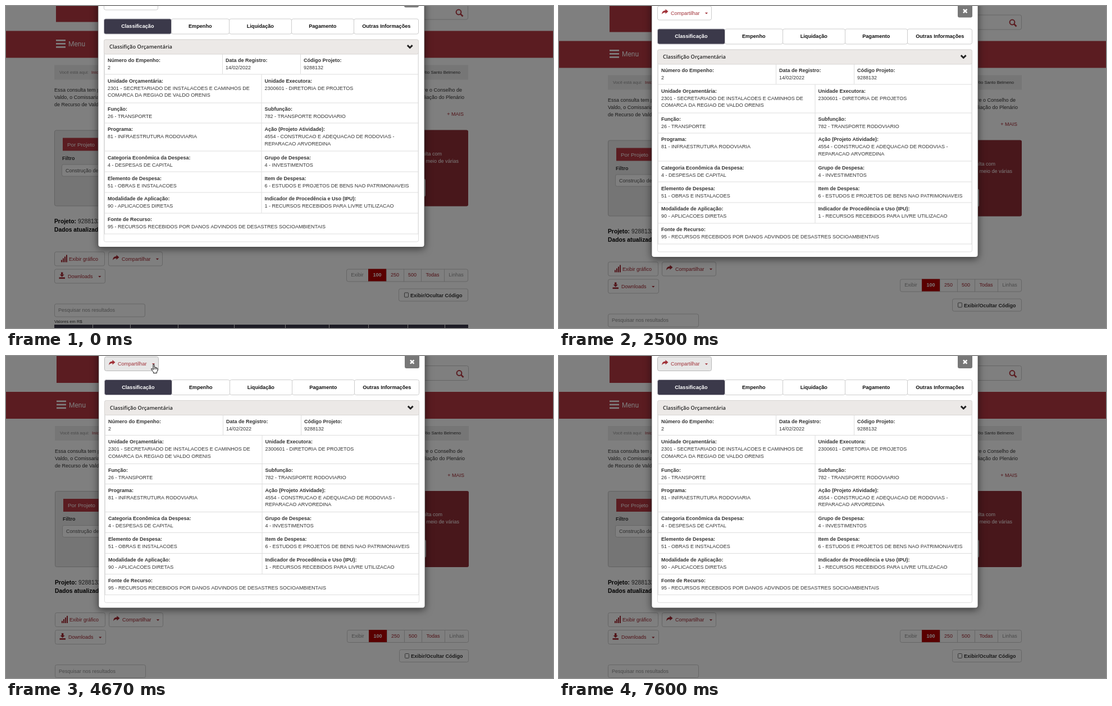
Animation, 974 px wide and 575 px high, one loop 8 s. Source, as an HTML page with a canvas:

```html
<!DOCTYPE html>
<html lang="pt-BR">
<head>
<meta charset="utf-8">
<title>Consulta de empenho</title>
<style>
html, body { margin: 0; width: 100%; height: 100%; overflow: hidden; background: #7f7f7f; }
canvas { display: block; }
</style>
</head>
<body>
<canvas id="stage" width="974" height="575"></canvas>
<script>
const ctx = document.getElementById('stage').getContext('2d');
const LOOP = 8000;
const SANS = '"Liberation Sans", Arial, sans-serif';
const DIM = { page: '#7f7f7f', line: '#666', red: '#5b1c21', link: '#511318', ink: '#1a1a1a' };

// Scroll steps: time, dx, dy
const SCROLL = [[0, -1, -19.5], [2340, 0, -5], [2500, 0, -1.5], [2640, 0, 0]];
// Pointer steps: time, shape, x, y
const POINTER = [
  [0, null], [750, arrow, 921, 194], [900, arrow, 793, 211], [1060, arrow, 786, 211],
  [1510, arrow, 784, 208], [1660, null], [2790, arrow, 705, -1], [2940, arrow, 650, 11],
  [3070, arrow, 620, 20], [3940, arrow, 394, 27], [4090, arrow, 257, 26],
  [4240, hand, 258, 19], [4390, hand, 258, 17], [4520, hand, 258, 14],
  [5410, hand, 257, 14], [5560, hand, 228, 26], [5710, hand, 227, 28],
  [5840, hand, 226, 28], [6850, arrow, 227, 37], [7600, null]
];

// One row: top, bottom, then cells of [x, label, ...lines]
const ROWS = [
  [105, 141, [176, 'Número do Empenho:', '2'], [386, 'Data de Registro:', '14/02/2022'], [525, 'Código Projeto:', '9288132']],
  [141.5, 192, [176, 'Unidade Orçamentária:', '2301 - SECRETARIADO DE INSTALACOES E CAMINHOS DE', 'COMARCA DA REGIAO DE VALDO ORENIS'],
    [455.5, 'Unidade Executora:', '2300601 - DIRETORIA DE PROJETOS']],
  [192, 228, [176, 'Função:', '26 - TRANSPORTE'], [455.5, 'Subfunção:', '782 - TRANSPORTE RODOVIARIO']],
  [228, 278, [176, 'Programa:', '81 - INFRAESTRUTURA RODOVIARIA'],
    [455.5, 'Ação (Projeto Atividade):', '4554 - CONSTRUCAO E ADEQUACAO DE RODOVIAS -', 'REPARACAO ARVOREDINA']],
  [278.5, 315, [176, 'Categoria Econômica da Despesa:', '4 - DESPESAS DE CAPITAL'], [455.5, 'Grupo de Despesa:', '4 - INVESTIMENTOS']],
  [315.5, 352, [176, 'Elemento de Despesa:', '51 - OBRAS E INSTALACOES'], [455.5, 'Item de Despesa:', '6 - ESTUDOS E PROJETOS DE BENS NAO PATRIMONIAVEIS']],
  [352, 389, [176, 'Modalidade de Aplicação:', '90 - APLICACOES DIRETAS'], [455.5, 'Indicador de Procedência e Uso (IPU):', '1 - RECURSOS RECEBIDOS PARA LIVRE UTILIZACAO']],
  [389, 426, [176, 'Fonte de Recurso:', '95 - RECURSOS RECEBIDOS POR DANOS ADVINDOS DE DESASTRES SOCIOAMBIENTAIS']]
];

const at = (steps, t) => steps.findLast(s => s[0] <= t);

function rect(x, y, w, h, color) {
  ctx.fillStyle = color;
  ctx.fillRect(x, y, w, h);
}

// The border lies inside the given bounds
function box(x, y, w, h, fill, stroke, radius = 3) {
  const inset = stroke ? .5 : 0;
  ctx.beginPath();
  ctx.roundRect(x + inset, y + inset, w - 2 * inset, h - 2 * inset, radius);
  if (fill) { ctx.fillStyle = fill; ctx.fill(); }
  if (stroke) { ctx.strokeStyle = stroke; ctx.lineWidth = 1; ctx.stroke(); }
}

// y is the middle of the capitals
function text(str, x, y, color, { size = 9, weight = 400, align = 'left', family = SANS } = {}) {
  ctx.font = `${weight} ${size}px ${family}`;
  ctx.textAlign = align;
  ctx.fillStyle = color;
  ctx.fillText(str, x, y + size * .36);
}

function polygon(points, fill, stroke) {
  ctx.beginPath();
  points.forEach(([x, y]) => ctx.lineTo(x, y));
  ctx.closePath();
  ctx.fillStyle = fill;
  ctx.fill();
  if (stroke) { ctx.strokeStyle = stroke; ctx.lineWidth = 1; ctx.stroke(); }
}

function polyline(points, color, width) {
  ctx.beginPath();
  points.forEach(([x, y]) => ctx.lineTo(x, y));
  ctx.strokeStyle = color;
  ctx.lineWidth = width;
  ctx.stroke();
}

const caret = (x, y, color) => polygon([[x - 2.6, y - 1], [x + 2.6, y - 1], [x, y + 1.8]], color);

function shareIcon(x, y, color) {
  ctx.beginPath();
  ctx.moveTo(x, y + 9.5);
  ctx.quadraticCurveTo(x + .3, y + 2.6, x + 6.5, y + 2.5);
  ctx.lineTo(x + 6.5, y);
  ctx.lineTo(x + 11.5, y + 4.3);
  ctx.lineTo(x + 6.5, y + 8.6);
  ctx.lineTo(x + 6.5, y + 6);
  ctx.quadraticCurveTo(x + 2, y + 5.8, x, y + 9.5);
  ctx.fillStyle = color;
  ctx.fill();
}

function shareButton(x, y, fill, border, color) {
  box(x, y, 97, 26, fill, border);
  shareIcon(x + 8, y + 6, color);
  text('Compartilhar', x + 24, y + 13, color);
  caret(x + 87.5, y + 13.3, color);
}

function pageHeader() {
  rect(90, -28, 76, 76, DIM.red);
  box(600, 17, 224, 27, DIM.page, DIM.line);
  ctx.beginPath();
  ctx.arc(807, 30.5, 4.4, 0, Math.PI * 2);
  ctx.strokeStyle = DIM.red;
  ctx.lineWidth = 2;
  ctx.stroke();
  polyline([[810.2, 33.7], [814.5, 38]], DIM.red, 2.6);

  rect(-2, 64, 980, 48, DIM.red);
  for (const y of [79.5, 85.5, 91.5]) rect(90, y, 17, 2.7, DIM.page);
  text('Menu', 112, 87.5, DIM.page, { size: 12, family: 'Roboto, sans-serif' });
}

function pageIntro() {
  rect(87, 125, 737, 26, '#767676');
  text('Você está aqui:', 96, 137.5, '#4a4a4a', { size: 7.6 });
  text('Início', 153, 137.5, DIM.link, { size: 7.7 });
  text('Rio Santo Belmeno', 810, 137.5, DIM.ink, { size: 7.7, align: 'right' });

  ['Essa consulta tem p', 'Valdo, o Comissariado', 'de Recurso de Valdo'].forEach((line, i) =>
    text(line, 87, 169.5 + i * 13, DIM.ink));
  text('entre o Conselho de', 813, 169.5, DIM.ink, { align: 'right' });
  text('mediação do Plenário', 817, 182.5, DIM.ink, { align: 'right' });
  text('+ MAIS', 816, 212.5, DIM.link, { align: 'right' });
}

function pageFilter() {
  box(87, 241, 737, 136, '#757575', '#626262');
  box(600, 241, 224, 136, '#48171b', null);
  rect(102, 255, 80, 23, DIM.red);
  text('Por Projeto', 110, 266.5, DIM.page, { size: 9.8 });
  text('Filtro', 101, 291, DIM.ink, { weight: 700 });
  box(100, 302, 120, 22, DIM.page, DIM.line);
  text('Construção de', 107, 312.8, '#2b2b2b');
  text('consulta com', 777, 283, DIM.page, { align: 'right' });
  text('por meio de várias', 807, 296, DIM.page, { align: 'right' });
  box(700, 328, 48, 32, DIM.page, null);

  text('Projeto:', 87, 403.8, '#000', { size: 10.3, weight: 700 });
  text('9288132', 129, 403.8, DIM.ink, { size: 10.3 });
  text('Dados atualizados', 87, 419, '#000', { size: 10.3, weight: 700 });
}

function pageTools() {
  box(87, 458, 90, 26, DIM.page, DIM.line);
  for (let i = 0; i < 4; i++) rect(99 + i * 3, 473 - i * 3, 2, 4 + i * 3, DIM.link);
  text('Exibir gráfico', 113, 471.2, DIM.link);
  shareButton(183, 458, DIM.page, DIM.line, DIM.link);

  box(87, 489, 91, 26, DIM.page, DIM.line);
  rect(99, 495, 3.4, 4, DIM.link);
  polygon([[96.7, 499], [104.7, 499], [100.7, 503.3]], DIM.link);
  rect(95.5, 504, 10.5, 2.6, DIM.link);
  text('Downloads', 111, 502.2, DIM.link);
  caret(167.8, 502.5, DIM.link);

  box(607, 489, 217, 23, DIM.page, DIM.line);
  const edges = [607, 646, 678, 709, 740, 781, 824];
  ['Exibir', '100', '250', '500', 'Todas', 'Linhas'].forEach((label, i) => {
    const x = edges[i], active = label === '100', muted = i % 5 === 0;
    if (i) rect(x, 489, 1, 23, DIM.line);
    if (active) rect(x, 489, 32, 22, '#5a0000');
    text(label, (x + edges[i + 1]) / 2, 499.5, active ? DIM.page : muted ? '#4a4a4a' : DIM.link,
      { align: 'center', weight: active ? 700 : 400 });
  });

  box(700, 524, 124, 23, DIM.page, DIM.line);
  box(710, 531, 8, 9, DIM.page, '#333', 1);
  text('Exibir/Ocultar Código', 721, 535.8, DIM.ink, { weight: 700 });

  box(87, 551, 162, 24, DIM.page, DIM.line);
  text('Pesquisar nos resultados', 94, 562.5, '#484848');
  text('Valores em R$', 87, 583, DIM.ink, { size: 7.6 });
  rect(87, 588.5, 737, 20, '#1d1c25');
  for (const x of [155, 222, 307, 407, 498, 576, 646, 716, 782]) rect(x, 588.5, 1, 20, '#777');
}

function modalFrame() {
  ctx.save();
  ctx.shadowColor = 'rgba(0,0,0,.55)';
  ctx.shadowBlur = 14;
  ctx.shadowOffsetY = 3;
  box(164.7, -60, 581.6, 510.3, '#555', null, 4);
  ctx.restore();
  box(165.4, -60, 580.2, 509.6, '#fff', null, 4);
  box(710, -3, 26, 25, '#777', null);
  polyline([[720, 7.3], [726.4, 13.7]], '#fff', 2.6);
  polyline([[726.4, 7.3], [720, 13.7]], '#fff', 2.6);
}

function modalTabs() {
  const edges = [175, 295, 398, 509, 620, 736];
  ['Classificação', 'Empenho', 'Liquidação', 'Pagamento', 'Outras Informações'].forEach((label, i) => {
    const x = edges[i], w = edges[i + 1] - x;
    box(x, 42, w + (i < 4 ? 1 : 0), 28, i ? '#fff' : '#3b394a', i ? '#ccc' : '#b4b3ba');
    text(label, x + w / 2 + .3, 55.3, i ? '#111' : '#fff', { size: 9.15, weight: 700, align: 'center' });
  });
}

function modalPanel() {
  box(175, 79, 561, 362, '#fff', '#ddd');
  box(175, 79, 561, 27, '#ece9e7', '#d8d5d3');
  text('Classifição Orçamentária', 185, 92.3, '#222', { size: 9.3, weight: 600, family: '"Open Sans", sans-serif' });
  polyline([[715.8, 89.6], [720.2, 94], [724.6, 89.6]], '#222', 2.9);

  rect(176, 105, 1, 322, '#ddd');
  rect(734.5, 105, 1, 322, '#ddd');
  for (const [top, bottom, ...cells] of ROWS) {
    rect(176, Math.floor(bottom), 559, 1, '#ddd');
    cells.forEach(([x, label, ...lines], i) => {
      if (i) rect(x, top, 1, bottom - top, '#ddd');
      text(label, x + 6, top + 11.6, '#333', { weight: 700 });
      lines.forEach((line, n) => text(line, x + 6, top + 24.4 + n * 12.8, '#333'));
    });
  }
}

function shareMenu() {
  ctx.save();
  ctx.shadowColor = 'rgba(0,0,0,.2)';
  ctx.shadowBlur = 7;
  ctx.shadowOffsetY = 3;
  box(175, 27, 97, 79, '#fff', null, 2);
  ctx.restore();
  box(175, 27, 97, 79, null, '#ccc', 2);
  ['Copiar Link', 'Zunivel', 'Lumirede', 'Falanovo'].forEach((item, i) =>
    text(item, 189, 37.3 + i * 19.4, '#333'));
}

function shareControl(t) {
  const open = t >= 4820 && t < 6850;
  const fill = t < 4390 ? '#fff' : t < 4520 ? '#f2f2f2' : '#e7e7e7';
  const focus = t >= 4820 && t < 6980;
  shareButton(175, 1, fill, focus ? '#6b9fd0' : t < 4390 ? '#ccc' : '#b8b8b8', '#a03138');
  if (open) shareMenu();
}

function arrow() {
  polygon([[.5, .5], [.5, 11.5], [2.9, 9.3], [4.8, 13.6], [6.5, 12.9], [4.6, 8.7], [8.3, 8.6]], '#fff', '#111');
}

function hand() {
  polygon([[4, 1.4], [5, .6], [6, 1.4], [6, 6], [8, 6.2], [10, 7], [12, 8.2], [12, 12], [10.6, 14.2],
    [10.6, 16.5], [4.4, 16.5], [4.4, 14.6], [.8, 10], [.9, 8.6], [2.2, 8.7], [4, 10.5]], '#fff', '#111');
  for (const x of [6, 8, 10]) rect(x - .4, 7, .8, 3, '#111');
}

function draw(t) {
  const [, dx, dy] = at(SCROLL, t);
  rect(0, 0, 974, 575, DIM.page);
  ctx.save();
  ctx.translate(dx, dy);
  pageHeader();
  pageIntro();
  pageFilter();
  pageTools();
  modalFrame();
  modalTabs();
  modalPanel();
  shareControl(t);
  ctx.restore();

  const [, shape, x, y] = at(POINTER, t);
  if (shape) {
    ctx.save();
    ctx.translate(x, y);
    shape();
    ctx.restore();
  }
}

const start = performance.now();
function tick() {
  draw((performance.now() - start) % LOOP);
  requestAnimationFrame(tick);
}
tick();
</script>
</body>
</html>
```
